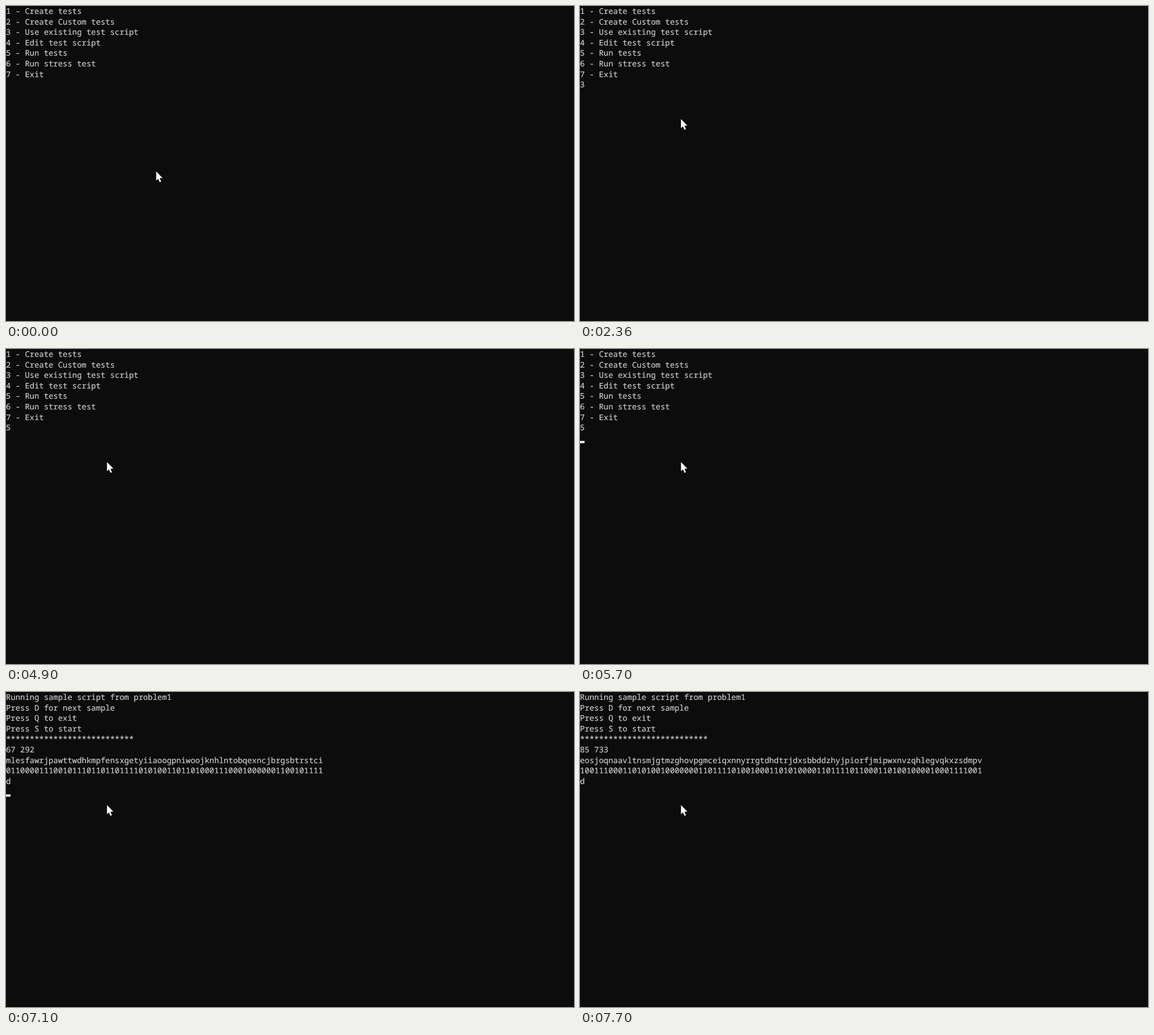
Animation, 1004 px wide and 558 px high, one loop 8000 ms. Source, as an HTML page:

```html
<!DOCTYPE html>
<html lang="en">
<head>
<meta charset="utf-8">
<title>Test runner console</title>
<style>
  html, body { margin: 0; width: 100%; height: 100%; overflow: hidden; background: #0c0c0c; }
  #stage { position: relative; width: 1004px; height: 558px; overflow: hidden; }
  #screen {
    position: absolute; left: 0; top: 1px; margin: 0;
    font: 13.94px/18.6px "Noto Sans Mono", "DejaVu Sans Mono", monospace;
    font-variant-ligatures: none;
    text-rendering: geometricPrecision;
    color: #ccc; -webkit-text-stroke: .2px #ccc; white-space: pre;
  }
  #caret { position: absolute; left: 0; top: 0; width: 8.37px; height: 4.4px; background: #f2f2f2; }
  #pointer { position: absolute; left: 0; top: 0; width: 14px; height: 21px; }
</style>
</head>
<body>
<div id="stage">
  <pre id="screen"></pre>
  <div id="caret"></div>
  <svg id="pointer" viewBox="0 0 14 21"><path fill="#fff" stroke="#000" paint-order="stroke" d="M.5 .3V16.6L4 13.2 6.6 19.3 9.2 18.2 6.8 12.1H11.8Z"/></svg>
</div>
<script>
const LOOP = 8000, CELL_W = 8.366, CELL_H = 18.6;

const menu = `1 - Create tests
2 - Create Custom tests
3 - Use existing test script
4 - Edit test script
5 - Run tests
6 - Run stress test
7 - Exit
`;

const sample = (...lines) => `Running sample script from problem1
Press D for next sample
Press Q to exit
Press S to start
${"*".repeat(27)}
${lines.join("\n")}
`;

const first = sample(
  "67 292",
  "mlesfawrjpawttwdhkmpfensxgetyiiaoogpniwoojknhlntobqexncjbrgsbtrstci",
  "0110000111001011101101101111010100110110100011100010000001100101111");

const second = sample(
  "85 733",
  "eosjoqnaavltnsmjgtmzghovpgmceiqxnnyrrgtdhdtrjdxsbbddzhyjpiorfjmipwxnvzqhlegvqkxzsdmpv",
  "1001110001101010010000000110111101001000110101000011011110110001101001000010001111001");

// [start, text, caret visible]; the caret sits at the end of the text
const output = [
  [0, menu, false],
  [1100, menu + "3", true],
  [1300, menu + "3", false],
  [1830, menu + "3", true],
  [2360, menu + "3", false],
  [2900, menu + "3", true],
  [3430, menu + "3", false],
  [3960, menu + "3", true],
  [4230, menu, true],
  [4500, menu, false],
  [4900, menu + "5", false],
  [5030, menu + "5", true],
  [5560, menu + "5", false],
  [5700, menu + "5\n", true],
  [5760, first, true],
  [6630, first + "d", false],
  [7100, first + "d\n", true],
  [7160, second, true],
  [7560, second + "d", true],
  [7700, second + "d", false]
];

// [start, x, y]
const moves = [[0, 265, 292.7], [500, 242, 267.5], [560, 196, 219.5], [630, 178, 200]];

const [screenEl, caretEl, pointerEl] =
  ["screen", "caret", "pointer"].map(id => document.getElementById(id));

const stepAt = (steps, t) => steps.findLast(s => s[0] <= t);
const place = (el, x, y) => { el.style.transform = `translate(${x}px, ${y}px)`; };

let shown;
function draw(t) {
  const step = stepAt(output, t);
  if (step !== shown) {
    shown = step;
    const [, text, caretOn] = step;
    const rows = text.split("\n");
    screenEl.textContent = text;
    caretEl.style.visibility = caretOn ? "visible" : "hidden";
    place(caretEl, rows.at(-1).length * CELL_W, rows.length * CELL_H - 4.6);
  }
  const [, x, y] = stepAt(moves, t);
  place(pointerEl, x, y);
}

const start = performance.now();
function tick() {
  draw((performance.now() - start) % LOOP);
  requestAnimationFrame(tick);
}
tick();
</script>
</body>
</html>
```
